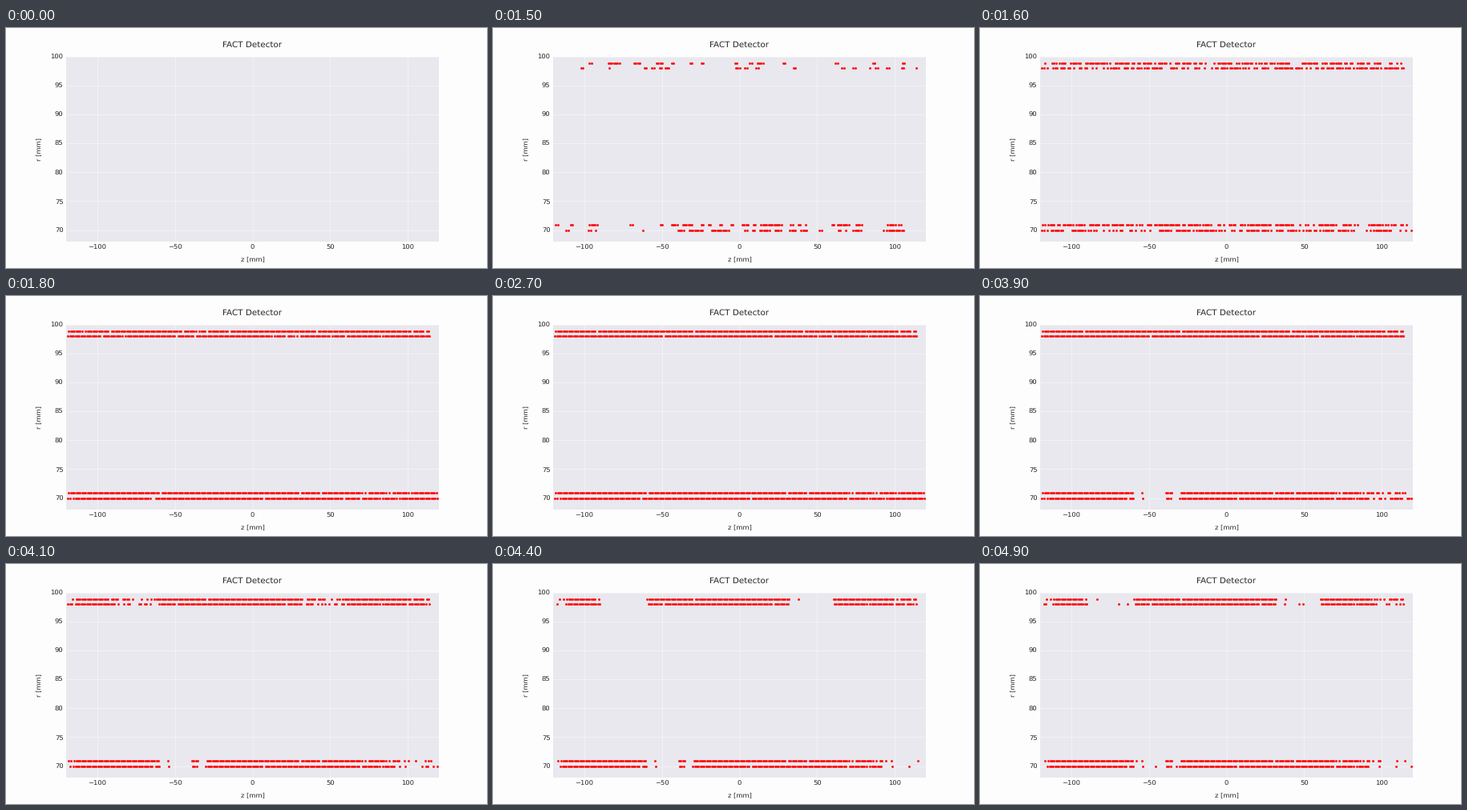
Recreate the animation shown at these times as a matplotlib script. Size 600 by 300 pixels, loop 5000 ms.

```python
import numpy as np
import matplotlib.pyplot as plt
from matplotlib.animation import FuncAnimation

FRAMES, INTERVAL = 50, 100
PITCH = 1.2          # mm between fibres
NEVER = FRAMES
BURST = 15           # frame of the first hits

plt.rcParams.update({
    "font.family": "DejaVu Sans", "font.size": 12, "text.hinting": "none",
    "text.color": ".15", "axes.labelcolor": ".15",
    "xtick.color": ".15", "ytick.color": ".15",
})

# Each barrel: z spans of the first burst with the hit odds inside and outside,
# and zones that go dark: (z from, z to, first frame, last frame, odds to stay)
OUTER = dict(
    burst=[(-85, -77), (-68, -38), (-3, 19), (62, 71)], odds=(.5, .07),
    zones=[(-89.8, -59.5, 40, 43, 0), (32, 60.3, 40, 44, .04),
           (-120, -112, 40, 44, .4), (92, 115, 40, 49, .45)])
INNER = dict(
    burst=[(-99.5, -91.5), (-43, -4), (1, 45), (63, 79), (92, 104)],
    odds=(.68, .15),
    zones=[(-59.4, -55, 36, 39, 0), (-53.6, -39.5, 36, 39, 0),
           (-34.8, -30.2, 36, 39, 0), (-120, -115, 40, 44, .3),
           (92, 120, 36, 44, .12)])


class Layer:
    """A row of fibres, each with a frame to light, go dark and light again."""

    def __init__(self, r, count, dead, barrel, z_max=120, seed=0):
        rng = np.random.default_rng(seed)
        z = (np.arange(count) - (count - 1) / 2) * PITCH
        self.r, self.z = r, z
        self.alive = z < z_max
        self.alive[dead] = False

        # Hits of the burst come in pairs of neighbouring fibres
        inside = np.any([(a <= z) & (z <= b) for a, b in barrel["burst"]], 0)
        luck = rng.random(count // 2 + 1).repeat(2)[:count]
        first = luck < np.where(inside, *barrel["odds"])
        fill = rng.choice([16, 17, 18, 19, 21, 22], count,
                          p=[.6, .25, .12, .01, .01, .01])
        self.on = np.where(first, BURST, fill)

        self.off = np.full(count, NEVER)
        self.back = np.full(count, NEVER)
        for a, b, start, end, stay in barrel["zones"]:
            fades = (a <= z) & (z <= b) & (rng.random(count) >= stay)
            self.off[fades] = rng.integers(start, end + 1, fades.sum())
            again = fades & (rng.random(count) < .06)
            self.back[again] = rng.integers(45, FRAMES, again.sum())

    def lit(self, f):
        shown = (f < self.off) | (f >= self.back)
        return self.z[self.alive & (f >= self.on) & shown]


layers = [
    Layer(98.87, 198, [22, 74, 133, 184, 191], OUTER, z_max=114, seed=1),
    Layer(98, 199, [58, 117, 141, 149, 168], OUTER, z_max=115, seed=2),
    Layer(70.87, 198, [49, 124, 135, 158, 160, 171, 173, 183], INNER, seed=3),
    Layer(70, 199, [2, 46, 105, 157, 168, 177], INNER, seed=4),
]

fig, ax = plt.subplots(figsize=(12, 6), dpi=50, facecolor="#fdfdfd")
ax.set(xlim=(-120, 120), ylim=(68, 100), facecolor="#e8e8ee")
ax.set_axisbelow(True)
ax.grid(color="white", lw=0.8, alpha=.75)
ax.tick_params(length=0, pad=5)
for spine in ax.spines.values():
    spine.set_visible(False)
ax.set_title("FACT Detector", fontsize=15, pad=17.5)
ax.set_xlabel("z [mm]", labelpad=11.5)
ax.set_ylabel("r [mm]", labelpad=14)
hits, = ax.plot([], [], "r.", ms=6, mew=1, snap=False)


def update(f):
    rows = [layer.lit(f) for layer in layers]
    r = np.repeat([layer.r for layer in layers], [len(z) for z in rows])
    hits.set_data(np.concatenate(rows), r)
    return hits,


anim = FuncAnimation(fig, update, frames=FRAMES, interval=INTERVAL,
                     repeat=True, repeat_delay=0)
plt.show()
```
